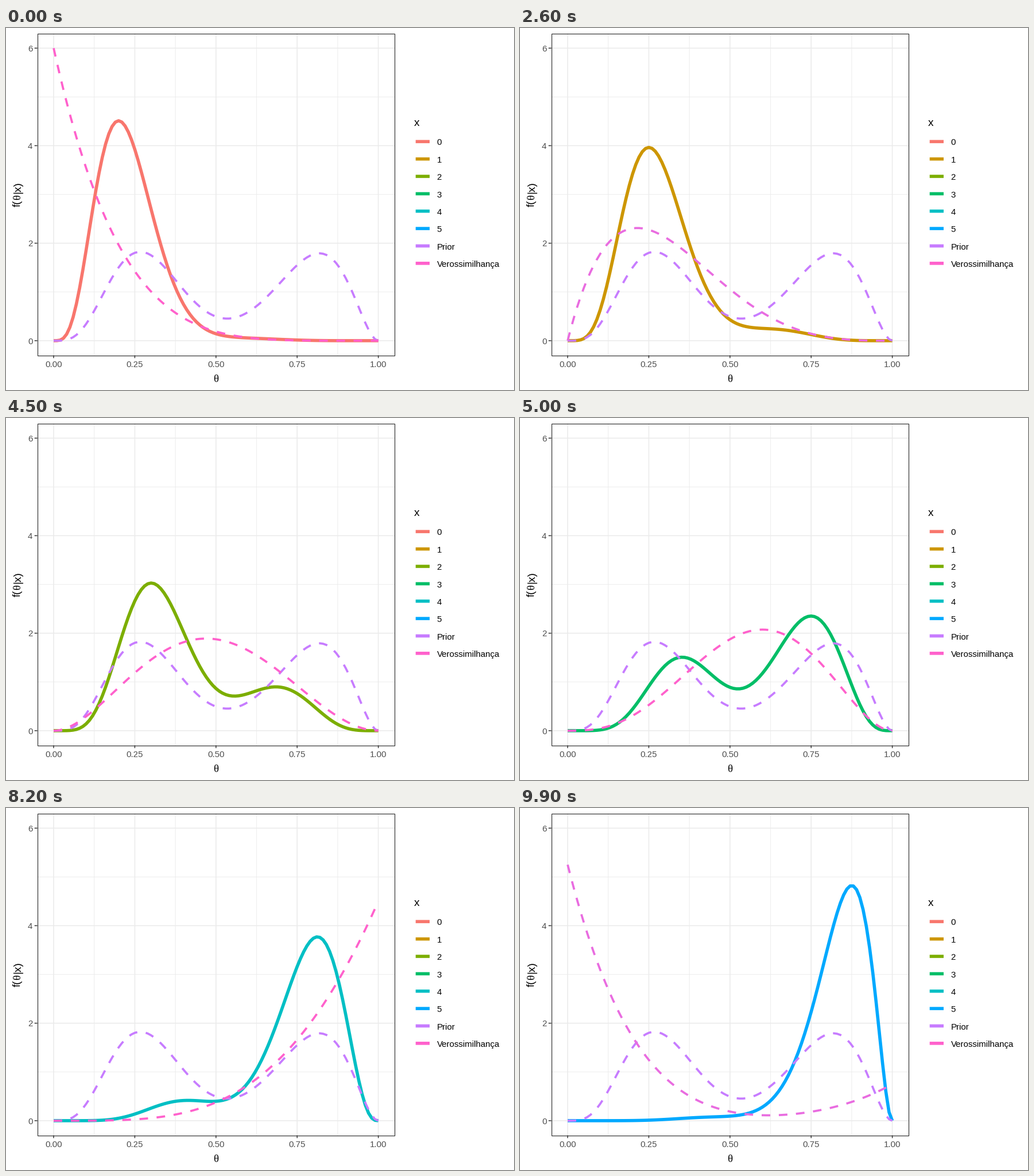
Recreate the animation shown at these times as a matplotlib script. Size 885 px wide and 632 px high, loop 10 s.

```python
import math

import numpy as np
import matplotlib.pyplot as plt
from matplotlib.animation import FuncAnimation
from matplotlib.colors import to_rgb
from matplotlib.patches import Rectangle

plt.rcParams["font.family"] = "Liberation Sans"
plt.rcParams["path.simplify"] = False

W, H, DPI = 885, 632, 100
PT = 72 / DPI                      # points per pixel
X0, XS = 83.0, 565.6               # theta axis in pixels
Y0, YS = 545.9, 85.12              # density axis in pixels
LEFT, RIGHT, TOP, BOTTOM = 54.5, 677.0, 9.5, 571.5
THIN, THICK = 3.74, 5.6

N = 5                              # binomial trials
MIX = [(5, 12), (10, 3)]           # equal-weight beta components
COLORS = ["#F8766D", "#CD9600", "#7CAE00", "#00BE67",
          "#00BFC4", "#00A9FF", "#C77CFF", "#FF61CC"]
LABELS = ["0", "1", "2", "3", "4", "5", "Prior", "Verossimilhança"]
PRIOR, LIK = COLORS[6], COLORS[7]

STARTS = [9, 26, 43, 60, 77, 93]   # first frame of each blend
STEPS = 8


def beta_fn(a, b):
    return math.gamma(a) * math.gamma(b) / math.gamma(a + b)


def beta_pdf(t, a, b):
    return t ** (a - 1) * (1 - t) ** (b - 1) / beta_fn(a, b)


def posterior(t, x):
    w = [beta_fn(a + x, b + N - x) / beta_fn(a, b) for a, b in MIX]
    total = sum(wi * beta_pdf(t, a + x, b + N - x)
                for wi, (a, b) in zip(w, MIX))
    return total / sum(w)


def px(t):
    return X0 + XS * t


def py(d):
    return Y0 - YS * d


theta = np.linspace(0, 1, 101)
prior = sum(0.5 * beta_pdf(theta, a, b) for a, b in MIX)
post = [posterior(theta, x) for x in range(N + 1)]
lik = [beta_pdf(theta, x + 1, N - x + 1) for x in range(N + 1)]

fig = plt.figure(figsize=(W / DPI, H / DPI), dpi=DPI, facecolor="white")
ax = fig.add_axes([0, 0, 1, 1])
ax.set_xlim(0, W)
ax.set_ylim(H, 0)
ax.axis("off")


def line(xs, ys, color, width, z, **kw):
    return ax.plot(xs, ys, color=color, lw=width * PT, zorder=z,
                   solid_capstyle="butt", dash_capstyle="butt",
                   solid_joinstyle="round", dash_joinstyle="round", **kw)[0]


def text(x, y, s, size, color="black", **kw):
    return ax.text(x, y, s, fontsize=size * PT, color=color,
                   va="baseline", **kw)


def grid_x(t, width):
    line([px(t)] * 2, [TOP, BOTTOM], "#EBEBEB", width, 1, snap=False)


def grid_y(d, width):
    line([LEFT, RIGHT], [py(d)] * 2, "#EBEBEB", width, 1, snap=False)


# Panel grid, ticks and axis labels
for t in (0.125, 0.375, 0.625, 0.875):
    grid_x(t, 0.9)
for d in (1, 3, 5):
    grid_y(d, 0.9)
for t in (0, 0.25, 0.5, 0.75, 1):
    grid_x(t, 1.6)
    line([px(t)] * 2, [BOTTOM, BOTTOM + 4.8], "#333333", 1.5, 2, snap=False)
    text(px(t), 592.5, f"{t:.2f}", 15, "#4D4D4D", ha="center")
for d in (0, 2, 4, 6):
    grid_y(d, 1.6)
    line([LEFT - 4.8, LEFT], [py(d)] * 2, "#333333", 1.5, 2, snap=False)
    text(46.5, py(d) + 5.6, str(d), 15, "#4D4D4D", ha="right")
ax.add_patch(Rectangle((LEFT, TOP), RIGHT - LEFT, BOTTOM - TOP, fill=False,
                       ec="#333333", lw=1.2 * PT, zorder=8))

text(365.8, 617.5, "θ", 19, ha="center", family="Liberation Serif")
for y, s, font in ((312, "f(", "Liberation Sans"),
                   (299.5, "θ", "Liberation Serif"),
                   (289, "|x)", "Liberation Sans")):
    text(25, y, s, 19, rotation=90, ha="right", family=font).set(
        ha="right", va="bottom", rotation_mode="anchor")
for label in ax.texts[-3:]:
    label.set(ha="left", va="baseline")

# Legend
text(710.3, 171.3, "x", 19, ha="left")
for i, (name, color) in enumerate(zip(LABELS, COLORS)):
    y = 198.3 + 30.36 * i
    line([713.7, 738], [y, y], color, THICK, 3, snap=False)
    text(750.5, y + 6.2, name, 15, ha="left")

# Curves
xs = px(theta)
post_line = line(xs, py(post[0]), COLORS[0], THICK, 4)
line(xs, py(prior), PRIOR, THIN, 5, linestyle=(0, (4, 4)))
lik_line = line(xs, py(lik[0]), LIK, THIN, 6, linestyle=(0, (4, 4)))
tint = 0.6 * np.array(to_rgb(LIK)) + 0.4 * np.array(to_rgb(PRIOR))


def draw(i):
    state = sum(i >= s + STEPS - 1 for s in STARTS)
    step = max(0, i - STARTS[state] + 1)
    mix = step / STEPS
    nxt = (state + 1) % (N + 1)
    # The posterior switches only once the blend is complete
    post_line.set_ydata(py(post[state]))
    post_line.set_color(COLORS[state])
    lik_line.set_ydata(py((1 - mix) * lik[state] + mix * lik[nxt]))
    lik_line.set_color(tint if step in (1, STEPS - 1) else LIK)
    return post_line, lik_line


anim = FuncAnimation(fig, draw, frames=100, interval=100,
                     repeat=True, repeat_delay=0, blit=False)
plt.show()
```
